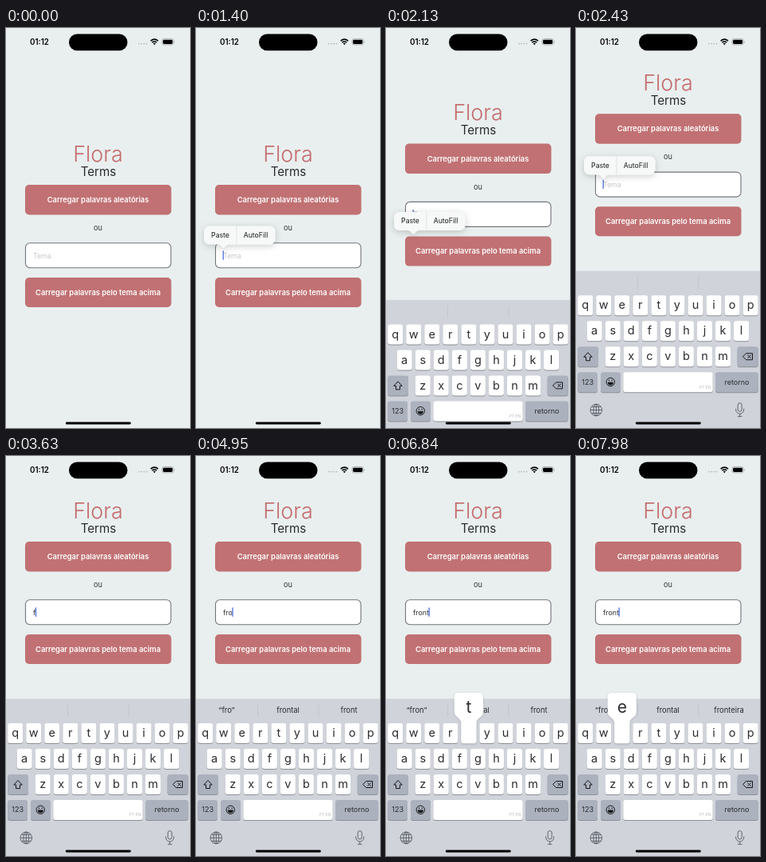
An HTML page for the animation above (8 s loop, 231 by 500 pixels).

```html
<!DOCTYPE html>
<html lang="pt">
<head>
<meta charset="utf-8">
<style>
html, body { margin: 0; width: 100%; height: 100%; overflow: hidden; background: #e9efef; }
svg { display: block; width: 231px; height: 500px; font-family: Inter, "Liberation Sans", sans-serif; }
.mid { text-anchor: middle; }
.btn { font-size: 9.35px; font-weight: 600; fill: #fff; }
</style>
</head>
<body>
<svg id="stage" viewBox="0 0 231 500">
  <defs>
    <filter id="soft" x="-30%" y="-60%" width="160%" height="240%">
      <feDropShadow dx="0" dy="2" stdDeviation="4.5" flood-color="#000" flood-opacity=".2"/>
    </filter>
    <filter id="lift" x="-30%" y="-20%" width="160%" height="140%">
      <feDropShadow dx="0" dy=".6" stdDeviation="1" flood-color="#000" flood-opacity=".22"/>
    </filter>
  </defs>
  <rect width="231" height="500" fill="#e9efef"/>

  <g id="form">
    <text class="mid" x="115.5" y="166.5" font-size="27" font-weight="300" fill="#c56b6d">Flora</text>
    <text class="mid" x="116" y="184.5" font-size="15.2" fill="#2b2b2f">Terms</text>
    <rect x="24" y="196" width="183.5" height="37.5" rx="5" fill="#c17173"/>
    <text class="mid btn" x="115.5" y="218">Carregar palavras aleatórias</text>
    <text class="mid" x="115.5" y="253" font-size="9.2" fill="#333338">ou</text>
    <rect x="24.5" y="268.8" width="182.5" height="31" rx="5.5" fill="#fff" stroke="#74747c" stroke-width="1.1"/>
    <text id="hint" x="34" y="287.6" font-size="8.8" fill="#c6c6ca">Tema</text>
    <text id="typed" x="34" y="287.6" font-size="8.9" fill="#333"></text>
    <rect id="caret" y="278.3" width="1.2" height="11.6" rx=".6" fill="#3d63d6"/>
    <rect x="24" y="312" width="183.5" height="37" rx="5" fill="#c17173"/>
    <text class="mid btn" x="115.5" y="333.7">Carregar palavras pelo tema acima</text>
  </g>

  <g id="menu">
    <path filter="url(#soft)" fill="#f7f8f8" d="M17 247.5H92.5a7 7 0 0 1 7 7V263.5a7 7 0 0 1-7 7H41C38 270.5 36 275 34.5 275S31 270.5 28 270.5H17a7 7 0 0 1-7-7V254.5a7 7 0 0 1 7-7Z"/>
    <path d="M51 247.5V270.5" stroke="#dcdedf" stroke-width=".8"/>
    <g font-size="8.7" fill="#1c1c1e" class="mid">
      <text x="30.5" y="261.9">Paste</text>
      <text x="75" y="261.9">AutoFill</text>
    </g>
  </g>

  <g id="board">
    <rect y="303.5" width="231" height="200" fill="#d0d3da"/>
    <path d="M77.5 311V326M154 311V326" stroke="#bfc3ca" stroke-width=".8"/>
    <g id="words" class="mid" font-size="9.4" fill="#2a2b2f"></g>
    <g id="keys" class="mid"></g>
    <g fill="none" stroke="#16171a" stroke-width="1" stroke-linejoin="round">
      <path d="M15 405.5L9.8 411H12.5V415.5H17.5V411H20.2Z"/>
      <path d="M209.5 410.5L213.5 406.5H221.5V414.5H213.5ZM215.5 408.5L219.5 412.5M219.5 408.5L215.5 412.5"/>
      <circle cx="43.3" cy="442.3" r="5.2"/>
      <path d="M40 442.8H46.6A3.3 3.3 0 0 1 40 442.8Z" fill="#16171a" stroke-width=".5"/>
      <path d="M41.5 439.4V441.2M45.1 439.4V441.2"/>
    </g>
    <g fill="none" stroke="#555a62" stroke-width=".9">
      <circle cx="25.3" cy="477.3" r="7.3"/>
      <ellipse cx="25.3" cy="477.3" rx="3.4" ry="7.3"/>
      <path d="M18 477.3H32.6M25.3 470V484.6M19.5 473.3H31.1M19.5 481.3H31.1"/>
      <rect x="203.2" y="468.5" width="5" height="10.5" rx="2.5"/>
      <path d="M200.7 475.5V477A5 5 0 0 0 210.7 477V475.5M205.7 482V485.3M203 485.3H208.4"/>
    </g>
    <g id="bubble">
      <path filter="url(#lift)" fill="#fff" d="M-13.5-38H13.5a4.5 4.5 0 0 1 4.5 4.5V-14C18-7 9.5-7 9.5 0V22.5a3 3 0 0 1-3 3H-6.5a3 3 0 0 1-3-3V0C-9.5-7-18-7-18-14V-33.5a4.500 4.500 0 0 1 4.500-4.500Z"/>
      <text id="letter" class="mid" y="-13" font-size="21" fill="#2a2b2f"></text>
    </g>
  </g>

  <text x="30" y="21.2" font-size="9.8" font-weight="600" fill="#050505">01:12</text>
  <rect x="79" y="7.5" width="73.5" height="20.8" rx="10.4"/>
  <g fill="#b3b8b9">
    <circle cx="167" cy="19.6" r=".9"/><circle cx="170.2" cy="19.6" r=".9"/>
    <circle cx="173.4" cy="19.6" r=".9"/><circle cx="176.6" cy="19.6" r=".9"/>
  </g>
  <path fill="none" stroke="#000" stroke-width="1.6" d="M181.600 16.200Q186.300 12.200 191 16.200M183.400 18.200Q186.300 15.800 189.200 18.200"/>
  <path d="M184.6 19.3Q186.3 18 188 19.3L186.3 21.2Z"/>
  <rect x="196" y="13.6" width="14.2" height="7.4" rx="2.3" fill="none" stroke="#8b8f90" stroke-width=".7"/>
  <rect x="197.1" y="14.7" width="12" height="5.2" rx="1.4"/>
  <path d="M211.2 15.9q1.2 1.4 0 2.8Z" fill="#8b8f90"/>
  <rect x="74.8" y="492.6" width="82" height="2.9" rx="1.4"/>
</svg>
<script>
const LOOP = 8000;
const $ = id => document.getElementById(id);
const set = (el, attrs) => { for (const k in attrs) el.setAttribute(k, attrs[k]); };
const add = (parent, tag, attrs, text = "") => {
  const el = document.createElementNS("http://www.w3.org/2000/svg", tag);
  set(el, attrs);
  el.textContent = text;
  parent.appendChild(el);
  return el;
};
const clamp = v => Math.max(0, Math.min(1, v));
const ramp = (t, start, length) => clamp((t - start) / length);

// Critically damped settle from 0 to 1
const settle = (t, start) => {
  const x = Math.max(0, t - start) / 50;
  return 1 - (1 + x) * Math.exp(-x);
};

// Keyboard
const spots = {};
function key(x, y, w, label, size, fill) {
  add($("keys"), "rect", { x, y: y + 1, width: w, height: 25, rx: 3, fill: "#8d9097" });
  add($("keys"), "rect", { x, y, width: w, height: 25, rx: 3, fill });
  if (label) add($("keys"), "text", { x: x + w / 2, y: y + 12.2 + size * 0.35, "font-size": size, fill: "#2a2b2f" }, label);
}
["qwertyuiop", "asdfghjkl", "zxcvbnm"].forEach((row, r) => {
  [...row].forEach((ch, i) => {
    const x = [11.7, 23.2, 46.2][r] + 23.05 * i, y = 334 + 32 * r;
    spots[ch] = [x, y];
    key(x - 9.5, y, 19, ch, 14.5, "#fff");
  });
});
const GRAY = "#abb1bd";
key(2.2, 398, 25.8, "", 0, GRAY);
key(202.7, 398, 26, "", 0, GRAY);
key(2.2, 430, 24.8, "123", 9, GRAY);
key(31, 430, 25, "", 0, GRAY);
key(59.3, 430, 112.4, "", 0, "#fff");
key(175, 430, 53.8, "retorno", 9, GRAY);
add($("keys"), "text", { x: 162, y: 450.3, "font-size": 5, fill: "#b9bbc0" }, "PT EN");

// Key presses: letter, bubble on, text change, bubble off
const presses = [
  ["f", 3040, 3130, 3260],
  ["r", 3650, 3770, 3900],
  ["o", 4640, 4740, 4900],
  ["n", 5640, 5760, 5900],
  ["t", 6640, 6740, 7020],
  ["e", 7860, 8100, 8100]
];
const hints = [
  [0, "", "", ""],
  [4150, "“fr”", "frente", "frio"],
  [4790, "“fro”", "frontal", "front"],
  [6020, "“fron”", "frontal", "front"],
  [7160, "“front”", "frontal", "fronteira"]
];
const slots = [38.5, 115.5, 192].map(x =>
  [0, 1].map(() => add($("words"), "text", { x, y: 321.3 })));

function drawHints(t) {
  let n = 0;
  while (n + 1 < hints.length && t >= hints[n + 1][0]) n++;
  const now = hints[n], old = hints[Math.max(0, n - 1)];
  const p = ramp(t, now[0], 150);
  slots.forEach(([a, b], i) => {
    const same = old[i + 1] === now[i + 1];
    a.textContent = old[i + 1];
    b.textContent = now[i + 1];
    a.setAttribute("opacity", same ? 0 : 1 - p);
    b.setAttribute("opacity", same ? 1 : p);
  });
}

function draw(t) {
  const shift = (id, y) => $(id).setAttribute("transform", `translate(0 ${y})`);
  shift("form", -89 * settle(t, 2034));
  shift("menu", -88 * settle(t, 2090));
  shift("board", 197 * (1 - settle(t, 1976)));
  $("menu").setAttribute("opacity", ramp(t, 1280, 110) * (1 - ramp(t, 2680, 200)));

  const text = presses.filter(p => t >= p[2]).map(p => p[0]).join("");
  $("typed").textContent = text;
  $("hint").setAttribute("opacity", text ? 0 : 1);
  const end = text ? $("typed").getComputedTextLength() : 0;
  set($("caret"), { x: 33.6 + end, opacity: t >= 1000 ? 1 : 0 });

  const down = presses.find(p => t >= p[1] && t < p[3]);
  $("bubble").setAttribute("visibility", down ? "visible" : "hidden");
  if (down) {
    $("letter").textContent = down[0];
    $("bubble").setAttribute("transform", `translate(${spots[down[0]].join(" ")})`);
  }
  drawHints(t);
}

const begin = performance.now();
function tick() {
  draw((performance.now() - begin) % LOOP);
  requestAnimationFrame(tick);
}
tick();
</script>
</body>
</html>
```
